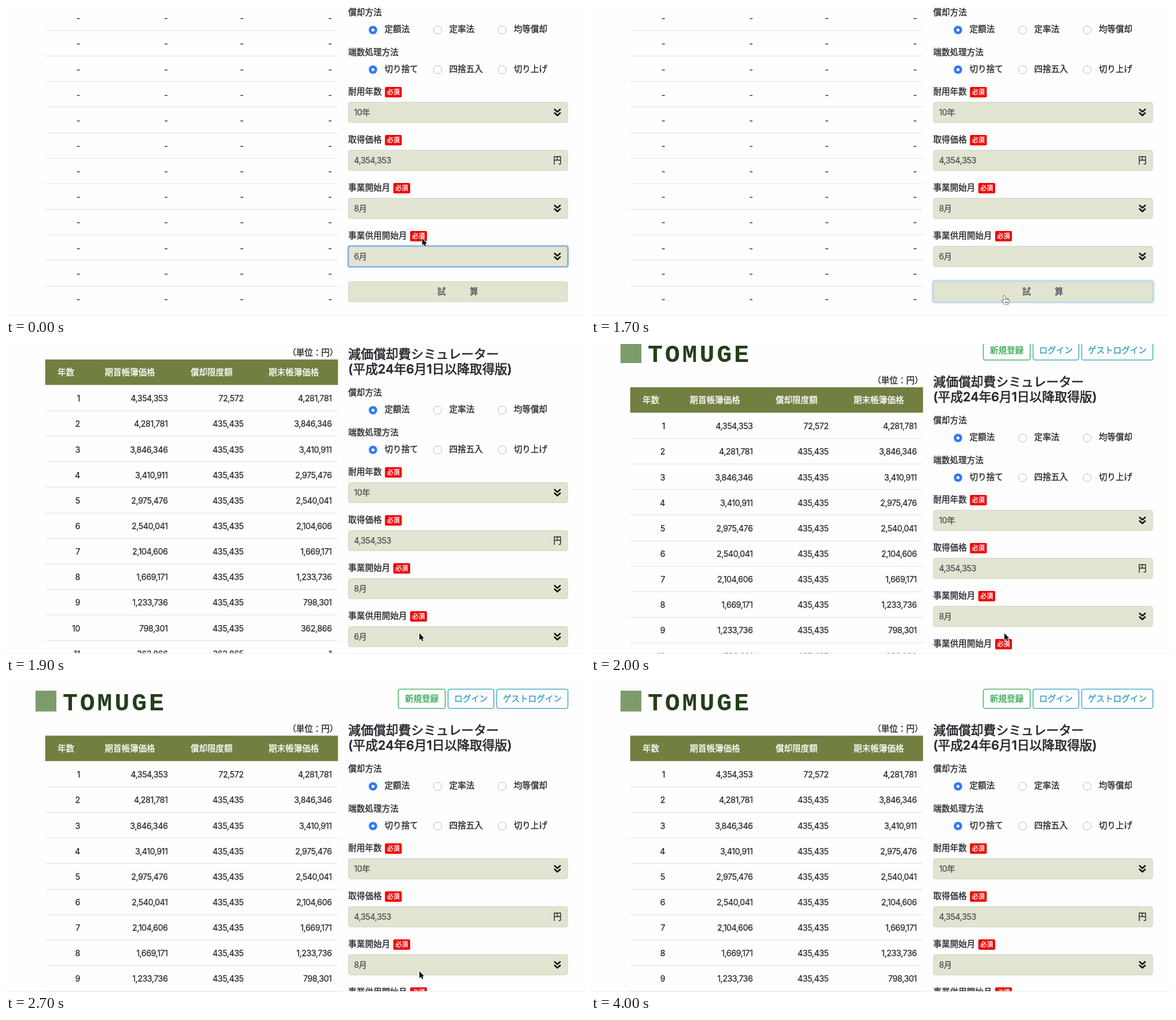
These frames come from a looping animation (1000x536 px, 4100 ms). An HTML page with a canvas:

```html
<!DOCTYPE html>
<html lang="ja">
<head>
<meta charset="utf-8">
<title>減価償却費シミュレーター</title>
<style>
html, body { margin: 0; width: 100%; height: 100%; overflow: hidden; background: #fefefe; }
canvas { display: block; width: 1000px; height: 536px; }
</style>
</head>
<body>
<canvas id="stage" width="1000" height="536"></canvas>
<script>
const ctx = document.getElementById('stage').getContext('2d');
const LOOP = 4100, STEP = 100;
const FONT = 'Inter, "Noto Sans CJK JP", "Noto Sans CJK", sans-serif';
const INK = '#26292d', FIELD_INK = '#4c5154', FIELD = '#e1e4d0';
const ROW = 44.15, COLS = [127.8, 279.3, 410.2, 562.6];
const PRICE = 4354353, FIRST = 72572, YEARLY = 435435;
const SCROLL_FROM = 139, SCROLL_START = 1694, SCROLL_TIME = 400;

// Cursor height at given times while it travels to the button
const POINTER = [[0, 402], [200, 424], [400, 460], [600, 483], [700, 483], [900, 501], [1000, 502], [1500, 502], [1600, 500]];

const money = n => n.toLocaleString('en-US');

// "bold" is the width of an outline that thickens the strokes a little
function text(s, x, y, { size = 14.5, color = INK, align = 'left', weight = 400, gap = 0, bold = 0.35, font = FONT } = {}) {
  ctx.font = `${weight} ${size}px ${font}`;
  ctx.letterSpacing = gap + 'px';
  ctx.textAlign = align;
  ctx.textBaseline = 'alphabetic';
  ctx.fillStyle = ctx.strokeStyle = color;
  ctx.lineWidth = bold;
  ctx.lineJoin = 'round';
  ctx.fillText(s, x, y + size * 0.37);
  if (bold) ctx.strokeText(s, x, y + size * 0.37);
}

function number(s, x, y, color = INK, align = 'right') {
  text(s, x, y, { size: 14.2, color, align, gap: -0.43, bold: 0.25 });
}

function box(x, y, w, h, r, fill, stroke, line = 1) {
  ctx.beginPath();
  ctx.roundRect(x, y, w, h, r);
  if (fill) { ctx.fillStyle = fill; ctx.fill(); }
  if (stroke) { ctx.strokeStyle = stroke; ctx.lineWidth = line; ctx.stroke(); }
}

function disc(x, y, r, fill, stroke) {
  ctx.beginPath();
  ctx.arc(x, y, r, 0, Math.PI * 2);
  ctx.fillStyle = fill;
  ctx.fill();
  if (stroke) { ctx.strokeStyle = stroke; ctx.lineWidth = 1; ctx.stroke(); }
}

function header() {
  box(51, 15, 36, 36, 0, '#7d9c6c');
  text('TOMUGE', 98, 33.5, { size: 43, weight: 700, color: '#263d1b', gap: 4, bold: 0, font: '"Liberation Mono", monospace' });
  const links = [[677, 81, '新規登録', '#34a853'], [763, 79, 'ログイン', '#2e9fbf'], [847, 123, 'ゲストログイン', '#2e9fbf']];
  for (const [x, w, label, color] of links) {
    box(x + 0.5, 12.3, w, 33.4, 3.5, null, color, 1.3);
    text(label, x + w / 2 + 0.5, 29, { color, align: 'center' });
  }
}

function table(filled) {
  text('（単位：円）', 573.5, 81, { align: 'right' });
  box(67.7, 92.7, 505.7, 44, 0, '#717f40');
  [['年数', 103.5], ['期首帳簿価格', 214], ['償却限度額', 355], ['期末帳簿価格', 497]]
    .forEach(([s, x]) => text(s, x, 115, { color: '#fff', align: 'center' }));
  const rows = filled ? 11 : 12;
  let open = PRICE;
  for (let i = 0; i < rows; i++) {
    const y = 160 + ROW * i;
    let cells = ['-', '-', '-', '-'];
    if (filled) {
      const cut = i ? Math.min(YEARLY, open - 1) : FIRST;
      cells = [String(i + 1), money(open), money(cut), money(open - cut)];
      open -= cut;
    }
    cells.forEach((s, c) => number(s, COLS[c], y));
    if (i < rows - 1) {
      ctx.fillStyle = '#dfe1e3';
      ctx.fillRect(67.7, Math.round(y + 21), 505.7, 1);
    }
  }
}

function radios(title, y, labels) {
  text(title, 591, y);
  labels.forEach((s, i) => {
    const x = 633.8 + 111.6 * i;
    if (i) disc(x, y + 30.5, 7, '#fff', '#bcbcbc');
    else {
      disc(x, y + 30.5, 7.3, '#3478f6');
      disc(x, y + 30.5, 2.6, '#fff');
    }
    text(s, x + 20, y + 29);
  });
}

function chevrons(x, y) {
  ctx.strokeStyle = '#111';
  ctx.lineWidth = 2.6;
  ctx.lineJoin = ctx.lineCap = 'round';
  ctx.beginPath();
  for (const dy of [-5, 1.2]) {
    ctx.moveTo(x - 4.7, y + dy);
    ctx.lineTo(x, y + dy + 4.3);
    ctx.lineTo(x + 4.7, y + dy);
  }
  ctx.stroke();
}

function field(label, y, value, { unit, focus } = {}) {
  text(label, 591, y);
  const bx = 591 + label.length * 14.5 + 5.5;
  box(bx, y - 8, 29, 18, 2, '#ee0505');
  text('必須', bx + 14.5, y + 1.2, { size: 10.9, color: '#fff', align: 'center' });
  box(591.5, y + 18.5, 378.5, 35, 3.5, FIELD, '#ced2c8');
  if (focus) box(591, y + 18, 379.5, 36, 3, null, '#80aeea', 2.6);
  number(value, 601, y + 36, FIELD_INK, 'left');
  if (unit) text(unit, 945, y + 36);
  else chevrons(952.3, y + 35.8);
}

function button(focus) {
  if (focus) box(590.3, 614.3, 381, 37, 4, null, '#c2dcf6', 3.6);
  box(591.5, 615.5, 378.5, 35, 3.5, FIELD, focus ? '#c5d3cf' : '#d3d6c8');
  text('試', 745, 633, { color: FIELD_INK });
  text('算', 801, 633, { color: FIELD_INK });
}

function form(selectFocus, buttonFocus) {
  const title = { size: 21.7, weight: 500, bold: 0.7 };
  text('減価償却費シミュレーター', 591, 83, title);
  text('(平成24年6月1日以降取得版)', 591, 109, title);
  radios('償却方法', 150, ['定額法', '定率法', '均等償却']);
  radios('端数処理方法', 218.5, ['切り捨て', '四捨五入', '切り上げ']);
  field('耐用年数', 287, '10年');
  field('取得価格', 370, money(PRICE), { unit: '円' });
  field('事業開始月', 453, '8月');
  field('事業供用開始月', 536, '6月', { focus: selectFocus });
  button(buttonFocus);
}

function cursor(x, y, hand) {
  const path = new Path2D(hand
    ? 'M4 1.5Q5.2.2 6.3 1.6L7 6Q8.4 5 9.3 6.3Q10.8 5.6 11.5 7Q13.5 6.6 13.7 8.5Q13.8 12 12 14V16H5.5Q4.5 13 1.3 10.2Q.8 8.2 2.7 8.5L4.6 9.6L3.5 3Z'
    : 'M0 0V11.8L2.7 9.4L4.7 13.8L6.6 12.9L4.8 8.7H8.2Z');
  ctx.save();
  ctx.translate(x, y);
  ctx.lineJoin = 'round';
  ctx.strokeStyle = hand ? '#222' : '#fff';
  ctx.fillStyle = hand ? '#fff' : '#000';
  ctx.lineWidth = hand ? 1.2 : 1.8;
  ctx.stroke(path);
  ctx.fill(path);
  if (hand) {
    ctx.lineWidth = 0.8;
    ctx.stroke(new Path2D('M7 6.2V8.5M9.3 6.5V8.7M11.5 7.2V9M7 11V14M9 11V14M11 11V14'));
  }
  ctx.restore();
}

function pointerY(t) {
  const i = POINTER.findIndex(p => p[0] >= t);
  if (i < 0) return 500;
  if (!i) return POINTER[0][1];
  const [t0, y0] = POINTER[i - 1], [t1, y1] = POINTER[i];
  return y0 + (y1 - y0) * (t - t0) / (t1 - t0);
}

function draw(t) {
  const clicked = t >= 1600, filled = t >= 1800;
  const p = Math.min(1, Math.max(0, (t - SCROLL_START) / SCROLL_TIME));
  const scroll = t < 1800 ? SCROLL_FROM : Math.round(SCROLL_FROM * (0.5 + Math.cos(Math.PI * p) / 2));
  ctx.fillStyle = '#fefefe';
  ctx.fillRect(0, 0, 1000, 536);
  ctx.save();
  ctx.translate(0, -scroll);
  header();
  table(filled);
  form(!clicked, clicked);
  ctx.restore();
  ctx.fillStyle = '#f3f3f3';
  ctx.fillRect(0, 534.5, 1000, 1.5);

  if (t >= 4000) return; // the cursor has left the page
  const y = pointerY(t), hand = y >= 476 && t < 1900;
  const x = t >= 1600 ? 714 : 719 - 6 * Math.min(1, t / 900);
  cursor(hand ? x - 5.5 : x, y, hand);
}

function tick(now) {
  const t = now % LOOP;
  draw(t - t % STEP);
  requestAnimationFrame(tick);
}
requestAnimationFrame(tick);
</script>
</body>
</html>
```
